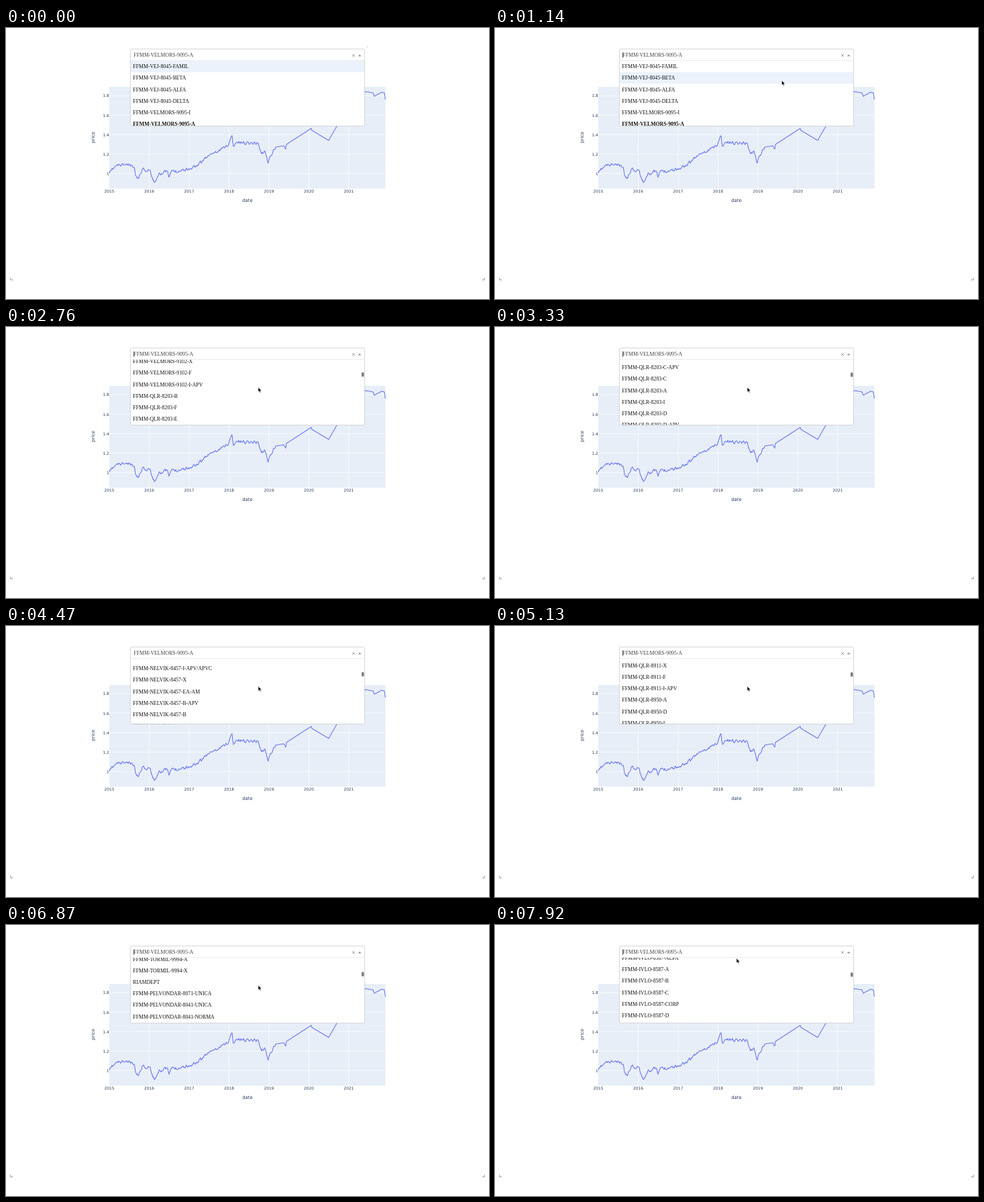
Animation of 720x405 px, one loop 8000 ms. Source, as an HTML page:

```html
<!DOCTYPE html>
<html lang="en">
<head>
<meta charset="utf-8">
<title>Fund price dropdown</title>
<style>
  html, body { margin: 0; width: 100%; height: 100%; overflow: hidden; background: #fff; }
  svg { display: block; width: 720px; height: 405px; }
  .axis { font: 5.9px "DejaVu Sans", sans-serif; fill: #2a3f5f; }
  .title { font-size: 6.9px; text-anchor: middle; }
  .mid { text-anchor: middle; }
  .end { text-anchor: end; }
  .serif { font: 7.8px "Liberation Serif", serif; fill: #111; }
  .grid { stroke: #fff; stroke-width: .7; }
  .price { fill: none; stroke: #6c78ee; stroke-width: 1.1; stroke-linejoin: round; }
</style>
</head>
<body>
<svg viewBox="0 0 720 405">
  <defs><clipPath id="clip"><rect x="186" y="48.9" width="348" height="97.3"/></clipPath></defs>

  <rect x="154" y="88" width="411.7" height="152" fill="#e7eef7"/>
  <g id="axes" class="axis"></g>
  <path id="price" class="price"/>
  <text class="axis title" x="360" y="260">date</text>
  <text class="axis title" transform="translate(132 163.5) rotate(-90)">price</text>

  <path d="M6.8 373.2V376.4H10M713.2 373.2V376.4H710" fill="none" stroke="#888" stroke-width=".9"/>
  <path id="speck" d="M537.6 28.4h2.4" stroke="#bbb" stroke-width=".8"/>

  <rect x="185.4" y="31.4" width="349.2" height="115.2" rx="2" fill="#fff" stroke="#ccc" stroke-width=".8"/>
  <path d="M186 48.6h348" stroke="#e2e2e2" stroke-width=".7"/>
  <text class="serif" x="190.3" y="43.1" style="fill:#444">FFMM-VELMORS-9095-A</text>
  <path id="caret" d="M190.4 36.4v8.6" stroke="#222" stroke-width=".7"/>
  <path d="M516.1 39.1l3.8 3.8m0-3.8l-3.8 3.8" stroke="#999" stroke-width=".9"/>
  <path d="M524.7 42.2h5l-2.5-2.6z" fill="#999"/>

  <g clip-path="url(#clip)">
    <rect id="hover" x="186" width="348" height="17.2" fill="#ebf2fc"/>
    <g id="rows" class="serif"></g>
  </g>
  <rect id="thumb" x="530" width="3.7" height="7" rx="1.8" fill="#808080"/>
  <path id="pointer" d="M0 0V6.9L1.6 5.5 2.7 8 3.9 7.4 2.8 5.1H5Z" fill="#000" stroke="#fff" stroke-width=".5"/>
</svg>

<script>
const LOOP = 8000, TICK = 30, ROW = 17.2, FIRST = 57.5;
const $ = id => document.getElementById(id);

function add(parent, tag, attrs, text = '') {
  const el = document.createElementNS('http://www.w3.org/2000/svg', tag);
  for (const key in attrs) el.setAttribute(key, attrs[key]);
  el.textContent = text;
  return parent.appendChild(el);
}

// Chart
for (let i = 0; i < 7; i++) {
  const x = 154 + 59.5 * i;
  if (i) add($('axes'), 'path', { class: 'grid', d: `M${x} 88V240` });
  add($('axes'), 'text', { class: 'mid', x, y: 246.4 }, 2015 + i);
}
for (let i = 0; i < 5; i++) {
  const y = 217.6 - 29.1 * i;
  add($('axes'), 'path', { class: 'grid', d: `M154 ${y}H565.7` });
  add($('axes'), 'text', { class: 'end', x: 153.8, y: y + 2.2 }, i ? (1 + i / 5).toFixed(1) : '1');
}

let seed = 11;
const random = () => (seed = seed * 16807 % 2147483647) / 2147483647;

// Daily prices wander around the first part of the trend; the later, sparse part is straight.
const DAILY_END = 402;
const trend = `154,217 164,206 180,204 191,208 193,220 198,224 203,211 214,212 221,231 228,217
241,215 243,223 246,215 275,210 291,202 297,193 317,184 332,174 337,161 339,177 343,171 376,172
381,188 386,184 391,202 394,191 402,178 414,176 417,181 418,174 455,150 456,153 481,168 493,147
536,95 547,97 549,102 560,96 564,97 565.5,107`.split(/\s+/).map(p => p.split(',').map(Number));

function pricePath() {
  let d = `M${trend[0]}`, drift = 0;
  trend.slice(1).forEach(([x1, y1], i) => {
    const [x0, y0] = trend[i];
    const steps = x1 <= DAILY_END ? Math.ceil(x1 - x0) : 1;
    for (let s = 1; s <= steps; s++) {
      const u = s / steps;
      drift = s < steps ? drift * .55 + (random() - .5) * 4.4 : 0;
      d += `L${x0 + (x1 - x0) * u} ${y0 + (y1 - y0) * u + drift}`;
    }
  });
  return d;
}
$('price').setAttribute('d', pricePath());

// Options: one entry per fund, expanded to one row per series
const common = 'A B C D I APV B-APV X F I-APV';
const options = [
  ['VEJ-8045', 'FAMIL BETA ALFA DELTA'],
  ['VELMORS-9095', 'I A B D E'],
  ['VELMORS-9102', common],
  ['QLR-8203', 'B F E C-APV C A I D D-APV'],
  ['QLR-8340', common],
  ['NELVIK-8457', 'A C D F E P I-APV/APVC X EA-AM B-APV B'],
  ['QLR-8911', common],
  ['QLR-8950', 'A D I B F B-APV F-APV C I-APV'],
  ['TORMIL-9871', common],
  ['TORMIL-9994', 'I B A X'],
  ['RIAMDEPT'],
  ['PELVONDAR-8071', 'UNICA'],
  ['PELVONDAR-8041', 'UNICA NORMA'],
  ['IVLO-8562', common],
  ['IVLO-8587', 'ALFA A B C CORP D E F']
].flatMap(([fund, list]) => list ? list.split(' ').map(s => `FFMM-${fund}-${s}`) : fund);
const chosen = options.indexOf('FFMM-VELMORS-9095-A');

const slots = Array.from({ length: 8 }, () => add($('rows'), 'text', { x: 189.3 }));

// Motion
const ENTER = 450, SCROLL = 2430, FLICK_GAP = 820, FLICK = 780;
const stops = [300, 480.4, 758.4, 1000, 1175.7, 1395, 1659.6];
const moves = [ // start, end, x, y
  [450, 780, 440, 76], [990, 1500, 380, 88], [1980, 2160, 376, 90.2], [7350, 7920, 360, 49.8]
];

const clamp = u => Math.max(0, Math.min(1, u));
const momentum = u => 1 - (1 - u) ** 5;
const smooth = u => u * u * (3 - 2 * u);

function scrollAt(t) {
  let y = 5.2 * smooth(clamp((t - 1980) / 180));
  stops.forEach((stop, i) => {
    y += (stop - y) * momentum(clamp((t - SCROLL - i * FLICK_GAP) / FLICK));
  });
  return y;
}

function pointerAt(t) {
  let x = 528, y = 42;
  for (const [start, end, toX, toY] of moves) {
    const u = smooth(clamp((t - start) / (end - start)));
    x += (toX - x) * u;
    y += (toY - y) * u;
  }
  return [x, y];
}

const caretOn = t => t >= 700 && (t + 290) % 1000 < 740;
const show = (id, on) => $(id).style.display = on ? '' : 'none';

function draw(t) {
  const scroll = scrollAt(t);
  const [px, py] = pointerAt(t);
  const rowY = k => FIRST + k * ROW - scroll;
  const top = Math.floor(scroll / ROW);

  slots.forEach((slot, i) => {
    const k = top + i;
    slot.textContent = options[k] || '';
    slot.setAttribute('y', rowY(k) + 2.6);
    slot.setAttribute('font-weight', k === chosen ? 'bold' : 'normal');
  });

  const hovered = t < ENTER ? 0 : Math.max(0, Math.round((py + scroll - FIRST) / ROW));
  $('hover').setAttribute('y', rowY(hovered) - ROW / 2);
  $('thumb').setAttribute('y', 67 + scroll * .0022);
  $('pointer').setAttribute('transform', `translate(${px} ${py})`);

  show('hover', t < SCROLL);
  show('thumb', t >= SCROLL);
  show('pointer', t >= ENTER);
  show('speck', t < ENTER);
  show('caret', caretOn(t));
}

function frame(now) {
  draw(Math.floor(now % LOOP / TICK) * TICK);
  requestAnimationFrame(frame);
}
draw(0);
requestAnimationFrame(frame);
</script>
</body>
</html>
```
